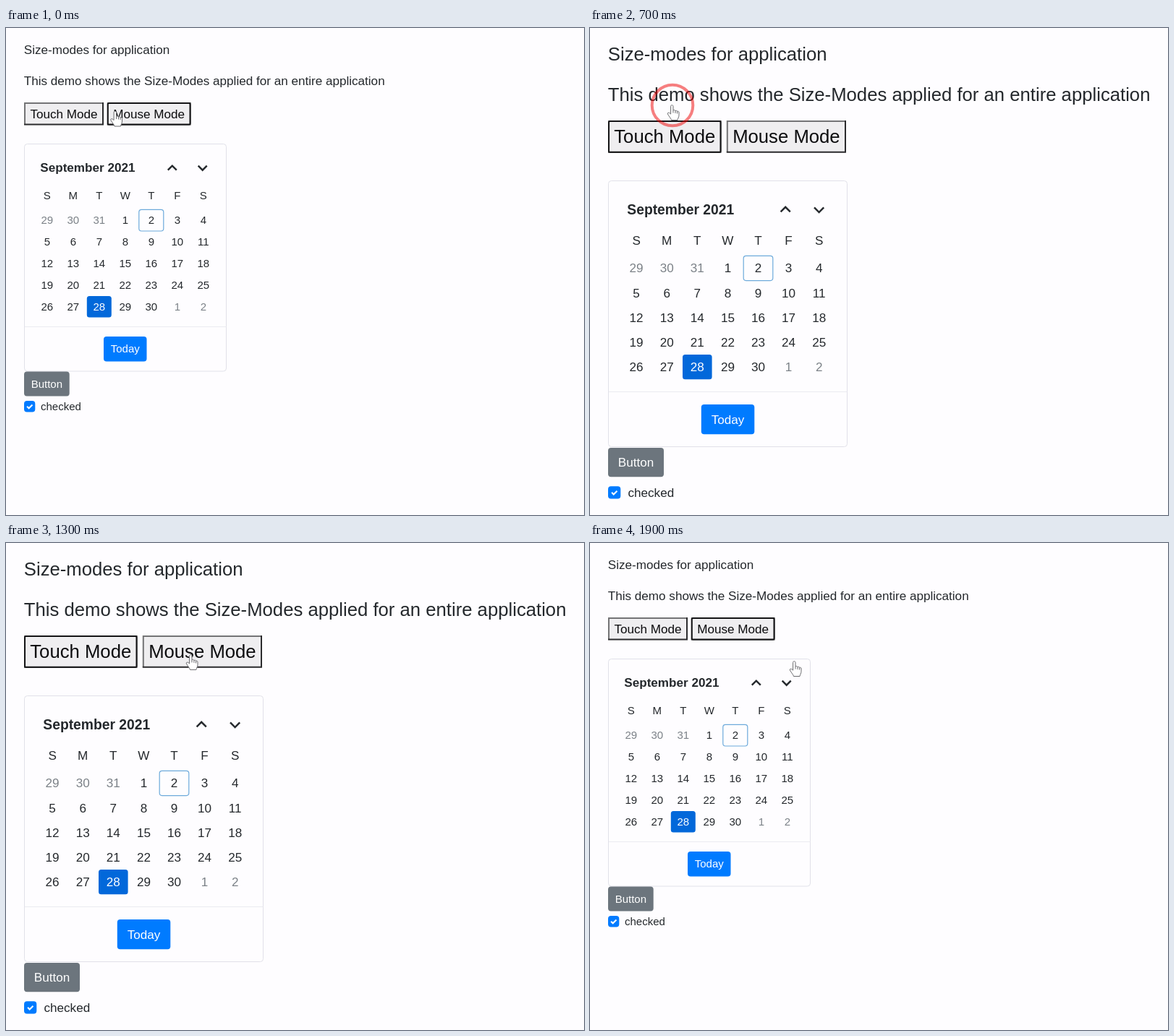
Animation of 799x674 px, one loop 2 s. Source, as an HTML page:

```html
<!DOCTYPE html>
<html lang="en">
<head>
<meta charset="utf-8">
<title>Size modes</title>
<style>
  html, body { margin: 0; width: 100%; height: 100%; overflow: hidden; background: #fefdff; }
  svg { display: block; }
  text { font-family: "Liberation Sans", Arial, sans-serif; white-space: pre; }
</style>
</head>
<body>
<svg id="stage" width="799" height="674" viewBox="0 0 799 674">
  <g id="mouse"></g>
  <g id="touch"></g>
  <circle id="ring" fill="none" stroke="#f00000" stroke-opacity=".5"/>
  <path id="hand" fill="#fff" stroke="#6a6a6e" stroke-linejoin="round"
    d="M-2.4 2C-2.4-.4 1-.4 1 2V7.5C1.5 6.6 3.8 6.8 4 8.4C4.6 7.4 6.4 7.6 6.6 9C7.4 8.3 9 8.8 9 10.5V14C9 17 7.5 18 7 21H-1.5C-2 18.5-4.5 16.5-6.6 12.5C-7.3 10.4-4.6 9.8-2.4 12.6ZM1 7.5V11M4 8.4V11.5M6.6 9V12"/>
</svg>
<script>
const INK = '#24282c', MUTED = '#7b8187', BLUE = '#007bff';
const byId = id => document.getElementById(id);

// Boxes are [left, top, right, bottom].
const layouts = {
  mouse: {
    body: 17.1, small: 15, heading: 17.1, lines: [29.9, 72.8],
    buttons: [[25, 103, 135, 134.5], [139.8, 103, 255.5, 134.5]],
    card: [25.5, 160.5, 304.5, 475], title: [47.3, 193.5], arrows: [229.8, 271.7, 193.7, 6],
    columns: [56.8, 36], weekdays: 232, rows: [266.2, 29.9], cell: [34, 29.6],
    divider: 413.5, today: [135, 427, 194.5, 461.5],
    button: [25, 475.5, 87.7, 509.5], check: [25, 516, 40.3, 531.5], label: 48
  },
  touch: {
    body: 25.7, small: 17.1, heading: 19.3, lines: [36.3, 91.9],
    buttons: [[25, 128, 181.5, 172.8], [188.8, 128, 354, 172.8]],
    card: [25.5, 211.5, 355.5, 579.5], title: [51.3, 251.2], arrows: [270.2, 316.6, 251.4, 6.6],
    columns: [64.1, 42.1], weekdays: 294, rows: [332.5, 34.15], cell: [40.6, 34.2],
    divider: 503.5, today: [153.8, 521, 227.3, 562.3],
    button: [25, 581, 102, 621.3], check: [25, 634.2, 42.3, 651.5], label: 52.5
  }
};

function buildMode(id) {
  const L = layouts[id], group = byId(id);

  function add(tag, attributes, parent = group) {
    const node = document.createElementNS('http://www.w3.org/2000/svg', tag);
    for (const [key, value] of Object.entries(attributes)) node.setAttribute(key, value);
    return parent.appendChild(node);
  }
  // y is the middle of the capital letters.
  function text(string, x, y, size, fill = INK, extra = {}) {
    add('text', { x, y: y + size * .346, 'font-size': size, fill, ...extra }).textContent = string;
  }
  const centred = (string, x, y, size, fill) =>
    text(string, x, y, size, fill, { 'text-anchor': 'middle' });
  const box = ([x, y, right, bottom], attributes, parent) =>
    add('rect', { x, y, width: right - x, height: bottom - y, ...attributes }, parent);
  const line = (d, stroke, width, parent) =>
    add('path', { d, fill: 'none', stroke, 'stroke-width': width }, parent);
  const middle = ([l, t, r, b]) => [(l + r) / 2, (t + b) / 2];

  text('Size-modes for application', 24.8, L.lines[0], L.body);
  text('This demo shows the Size-Modes applied for an entire application', 24.8, L.lines[1], L.body);

  const focusFrames = L.buttons.map((b, i) => {
    const [l, t, r, bottom] = [b[0] + 1, b[1] + 1, b[2] - 1, b[3] - 1];
    box(b, { fill: '#efeef0' });
    line(`M${l} ${bottom}V${t}H${r}`, '#747476', 2);
    line(`M${l - 1} ${bottom}H${r}V${t - 1}`, '#2c2c2e', 2);
    const focus = box([l, t, r, bottom], { rx: 1.5, fill: '#efeef0', stroke: '#141416', 'stroke-width': 2 });
    centred(['Touch Mode', 'Mouse Mode'][i], ...middle(b), L.body, '#0c0c0e');
    return focus;
  });

  box(L.card, { rx: 4, fill: 'none', stroke: '#e1e1e9' });
  text('September 2021', ...L.title, L.heading, INK, { 'font-weight': 'bold' });
  const [upX, downX, arrowY, w] = L.arrows;
  line(`M${upX - w} ${arrowY + 3}l${w} ${-w}l${w} ${w}`, INK, 2.4);
  line(`M${downX - w} ${arrowY - 3}l${w} ${w}l${w} ${-w}`, INK, 2.4);

  const columnX = i => L.columns[0] + i * L.columns[1];
  [...'SMTWTFS'].forEach((day, i) => centred(day, columnX(i), L.weekdays, L.small));
  const [cellW, cellH] = L.cell;
  for (let i = 0; i < 35; i++) {
    const day = i - 2, inMonth = day >= 1 && day <= 30;
    const x = columnX(i % 7), y = L.rows[0] + Math.floor(i / 7) * L.rows[1];
    const cell = [x - cellW / 2, y - cellH / 2, x + cellW / 2, y + cellH / 2];
    if (day === 2) box(cell, { rx: 3.5, fill: 'none', stroke: '#6daadb', 'stroke-width': 1.2 });
    if (day === 28) box(cell, { rx: 3.5, fill: '#0268da' });
    const number = day < 1 ? day + 31 : inMonth ? day : day - 30;
    centred(number, x, y, L.small, day === 28 ? '#fff' : inMonth ? INK : MUTED);
  }

  line(`M26 ${L.divider}H${L.card[2]}`, '#ebebf0', 1);
  box(L.today, { rx: 4, fill: BLUE });
  centred('Today', ...middle(L.today), L.small, '#fff');
  box(L.button, { rx: 4, fill: '#6c757d' });
  centred('Button', ...middle(L.button), L.small, '#fff');

  box(L.check, { rx: 4, fill: BLUE });
  const [checkX, checkY] = middle(L.check);
  line(`M${checkX - 3.6} ${checkY}l2.6 2.6l4.8 -4.8`, '#fff', 2.1);
  text('checked', L.label, checkY, L.small);

  return (visible, focused) => {
    group.style.display = visible ? '' : 'none';
    focusFrames.forEach((frame, i) => frame.style.display = i === focused ? '' : 'none');
  };
}

const showMouse = buildMode('mouse'), showTouch = buildMode('touch');
const ring = byId('ring'), hand = byId('hand');
const clamp = v => Math.min(1, Math.max(0, v));
const mix = (a, b, t) => a + (b - a) * t;
const START = [151.5, 115], FIRST = [114, 106.5], SECOND = [283, 163.5];

function pointerAt(ms) {
  const [from, to, t] = ms < 1000
    ? [START, FIRST, clamp(ms / 500)]
    : [FIRST, SECOND, clamp((ms - 1000) / 500)];
  const eased = 1 - (1 - t) ** 2;
  return from.map((v, i) => mix(v, to[i], eased));
}

function ringRadius(ms) {
  return { 600: 34, 700: 28.3, 1600: 34, 1700: 5.5 }[ms] || 0;
}

function draw(now) {
  const ms = Math.floor(now % 2000 / 100) * 100;
  const touch = ms >= 700 && ms < 1700;
  const focused = ms >= 600 && ms < 1600 ? 0 : 1;
  showMouse(!touch, focused);
  showTouch(touch, focused);

  const [x, y] = pointerAt(ms), radius = ringRadius(ms);
  hand.setAttribute('transform', `translate(${x} ${y})`);
  hand.style.display = ms >= 900 && ms < 1300 ? 'none' : '';
  ring.setAttribute('cx', x);
  ring.setAttribute('cy', y + .5);
  ring.setAttribute('r', radius);
  ring.setAttribute('stroke-width', radius > 20 ? 4 : 1.2);
  ring.style.display = radius ? '' : 'none';
}

const origin = performance.now();
function tick() {
  draw(performance.now() - origin);
  requestAnimationFrame(tick);
}
tick();
</script>
</body>
</html>
```
